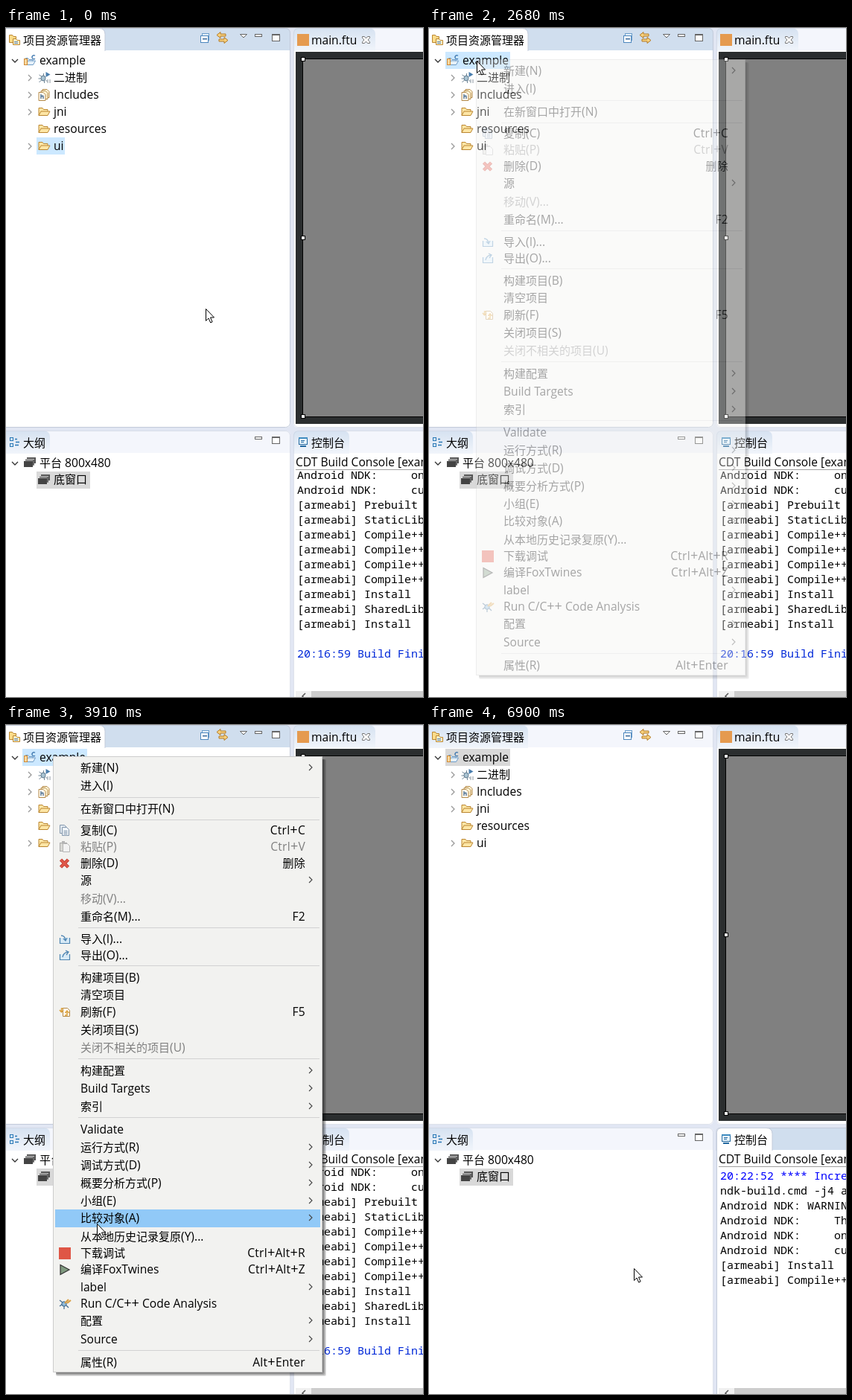
These frames come from a looping animation (560x899 px, 8950 ms). An HTML page:

```html
<!DOCTYPE html>
<html lang="zh-CN">
<head>
<meta charset="utf-8">
<title>IDE project menu</title>
<style>
html, body { margin: 0; width: 100%; height: 100%; overflow: hidden; background: #e1e6f3; }
svg { display: block; width: 560px; height: 899px; }
text { font: 15.6px "Open Sans", "Noto Sans CJK SC", "Noto Sans CJK", sans-serif; white-space: pre; }
.cjk { font-size: 15px; }
.plus { font-size: 18px; }
.mono { font: 15px "Noto Sans Mono", "DejaVu Sans Mono", monospace; }
.key { letter-spacing: .25px; }
</style>
</head>
<body>
<svg id="stage" viewBox="0 0 560 899"></svg>
<script>
const LOOP = 8950;
const GRAY = '#d9d9d9', PICK = '#cce8ff', HOVER = '#e5f3ff', MENU_HOT = '#91c9f7';

// ---- markup helpers
const rect = (x, y, w, h, fill, extra = '') =>
  `<rect x="${x}" y="${y}" width="${w}" height="${h}" fill="${fill}" ${extra}/>`;
const line = (d, stroke, w = 1, fill = 'none') =>
  `<path d="${d}" stroke="${stroke}" stroke-width="${w}" fill="${fill}"/>`;
const group = (id, body) => `<g id="${id}">${body}</g>`;
const at = (x, y, body) => `<g transform="translate(${x} ${y})">${body}</g>`;
const text = (x, y, s, fill = '#000', extra = '') =>
  `<text x="${x}" y="${y}" fill="${fill}" ${extra}>` +
  s.replace(/[\u4e00-\u9fff]+/g, '<tspan class="cjk">$&</tspan>')
    .replace(/\++/g, '<tspan class="plus">$&</tspan>') + '</text>';
const mono = (y, s, fill = '#000') => `<text class="mono" x="391" y="${y}" fill="${fill}">${s}</text>`;

// ---- icons, each about 16px
const box = (x, y, w, h, fill, stroke) => rect(x + .5, y + .5, w, h, fill, `stroke="${stroke}"`);
const folder = line('M.5 12.5V2.5h5l1.5 2h5.5v2.5M.5 12.5l3-5.5h12l-3 5.5z', '#bb8630', 1, '#fde6a6');
const page = (x, y, fill, stroke) => line(`M${x + .5} ${y + .5}h6l3 3v8h-9z`, stroke, 1, fill);
const icon = {
  folder,
  explorer: line('M.5 11.5v-10h4l1.5 2h3.5v8z', '#bb8630', 1, '#fbdc8a') +
    line('M5.5 14.5v-8h4l1.5 2h3.5v6z', '#bb8630', 1, '#fff1c4') + rect(7, 10, 5, 1, '#5b86b8') + rect(7, 12, 5, 1, '#5b86b8'),
  project: line('M2.5 13.5v-9h3l1.5 2h5v2M2.5 13.5l3-5.5h10l-3 5.5z', '#6f9cc6', 1, '#e6f1fa') +
    box(0, 5, 4, 8, '#f8d9a0', '#d08a35') + line('M15 1.2a2.500 2.500 0 1 0 0 4', '#3a74ad', 1.2),
  binary: line('M1 4l3 2M0 9h4M1 14l3-3M7 2v4M8 15v-3M12 13l-2-2', '#6d8394', 1) +
    '<ellipse cx="6.5" cy="8.5" rx="3" ry="3.500" fill="#a9c3d2" stroke="#5d788c"/>' +
    line('M10 0l6 3.5-6 3.5z', 'none', 0, '#4a7ead') + line('M12.500 10v5M15.500 10v5', '#8d98a2'),
  includes: page(5, 0, '#fff4d6', '#b48a4a') + page(3, 2, '#fff4d6', '#b48a4a') + page(0, 4, '#fffaf0', '#b48a4a') +
    line('M3.5 7v6M3.5 10q3-1.5 3 0v3', '#44698f', 1.3),
  outline: box(1, 1, 4, 4, '#cfe5f7', '#2b78b5') + box(1, 9, 4, 4, '#cfe5f7', '#2b78b5') +
    line('M8 3.5h3M8 11.5h5M9 7.5h5', '#2b78b5', 1.4),
  windows: rect(4, 0, 12, 8, '#555') + rect(2, 2, 12, 8, '#eee') + rect(2, 2.7, 12, 8, '#666') +
    rect(0, 4.5, 12, 8, '#eee') + rect(0, 5, 12, 8, '#444'),
  console: box(1, 1, 11, 9, '#e7f4fd', '#22689f') + rect(1, 1, 12, 2, '#3f8cc0') + rect(4, 5, 5, 1, '#22689f') +
    rect(4, 7, 4, 1, '#22689f') + rect(3, 12, 8, 2, '#22689f'),
  copy: page(1, 0, '#e4ebf2', '#8296ab') + page(4, 3, '#eef3f8', '#8296ab') + line('M6.5 8.5h5M6.5 10.5h5M6.5 12.5h5', '#8296ab'),
  paste: box(1, 2, 9, 11, '#d8d8d4', '#aaa') + rect(4, 0, 4, 4, '#b5b5b5') + page(5, 3, '#f2f2f2', '#b5b5b5'),
  remove: line('M2.5 3l10 10M12.5 3l-10 10', '#b8362a', 4.4) + line('M2.5 3l10 10M12.5 3l-10 10', '#e0584a', 2.8),
  import: line('M1.5 6v7.5h13V6', '#4f86b3', 1.2, '#d8eaf6') + line('M3 3q5 0 6 6M6 7l3 3 2-4', '#4f86b3', 1.3),
  export: line('M1.5 6v7.5h13V6', '#4f86b3', 1.2, '#d8eaf6') + line('M5 10q1-6 7-7M9 1l4 2-3 4', '#4f86b3', 1.3),
  refresh: page(5, 2, '#fffaf0', '#b48a4a') + line('M6 3H3.5v4M1 5l2.5 3L6 5M8 12h3V8M8.5 9l2.5-3 2.5 3', '#d99c33', 1.4),
  badge: rect(0, 0, 16, 16, '#df5646'),
  run: line('M2 1.5l12 6.5-12 6.5z', '#333', 1.2, '#7f9a7f'),
  analysis: line('M1 3l4 3M1 11l4-3M7 15v-4M13 13l-3-3', '#41698d', 1.2) +
    '<circle cx="7" cy="8" r="3.2" fill="#8fb9d8" stroke="#35628a"/>' + line('M8 7l5-5M11 7l5-4', '#d9a047', 2.2)
};

const chevron = (x, y, open) => open
  ? line(`M${x - 4} ${y - 2}l4 4 4-4`, '#333', 1.3)
  : line(`M${x - 2} ${y - 4}l4 4-4 4`, '#9a9a9a', 1.3);

// ---- panels
function panel(x, y, w, h, tabW, active) {
  const b = '#c3cbda', top = y + .5;
  const tab = `M${x} ${y + 31}V${top + 5}q0-5 5-5H${x + tabW - 8}q8 0 8 8V${y + 31}`;
  return rect(x, y, w, h, active ? '#d0deee' : '#f4f6fc', 'rx="6"') +
    rect(x, y + 30, w, h - 36, '#fff') + rect(x, y + h - 40, w, 40, '#fff', 'rx="6"') +
    line(tab, active ? b : 'none', 1, active ? '#fff' : 'url(#idle)') +
    rect(x + .5, top, w - 1, h - 1, 'none', `rx="6" stroke="${b}" stroke-opacity="${active ? 1 : .55}"`);
}
const minMax = y => box(334, y, 9, 3, '#fff', '#666') + box(357, y, 10, 9, '#fff', '#666') + rect(357, y, 11, 2, '#666');

function tree() {
  const rows = [['二进制', 'binary', 1], ['Includes', 'includes', 1], ['jni', 'folder', 1], ['resources', 'folder', 0], ['ui', 'folder', 1]];
  return rect(22, 32, 87, 23, 'none', 'id="pickRoot"') + rect(41, 147, 38, 23, 'none', 'id="pickUi"') +
    chevron(12, 44, true) + at(24, 36, icon.project) + text(45, 49, 'example') +
    rows.map(([s, ic, more], i) => {
      const y = 67 + i * 23;
      return (more ? chevron(32, y, false) : '') + at(43.5, y - 8, icon[ic]) + text(64, y + 5, s);
    }).join('');
}

const toolbar = box(263, 7, 9, 9, '#e3effa', '#6d9ecb') + box(261, 10, 10, 9, '#fff', '#4c86bd') + rect(264, 14, 6, 1.4, '#2b5f96') +
  line('M283 9.5l5-4v2.5h7v3h-7v2.5zM298 16.5l-5-4v2.5h-7v3h7v2.5z', '#b47a24', 1, '#f6cf7c') +
  line('M314.5 8.5h9l-4.5 4.5z', '#666', 1, '#fff');

function editor() {
  const grip = y => box(396, y - 3, 5, 5, '#fff', '#000') + rect(398, y - 1, 2, 2, '#fff');
  return panel(386, 0, 200, 537, 110, false) + rect(391, 8, 16, 16, '#e59a4f') + text(410, 22, 'main.ftu') +
    line('M478.5 11.5h3l2 2.5 2-2.5h3v2l-2.5 2.5 2.5 2.5v2h-3l-2-2.5-2 2.5h-3v-2l2.5-2.5-2.5-2.5z', '#777', 1, '#fff') +
    rect(389, 32, 171, 500, '#2b2e2f') + rect(398.5, 41.5, 180, 481, '#808080', 'stroke="#000"') +
    grip(42) + grip(282) + grip(522);
}

const tag = s => '[armeabi] ' + s;
const ndk = s => 'Android NDK:     ' + s;
const oldLog = [ndk('only'), ndk('current'), tag('Prebuilt'), tag('StaticLibrary'), tag('Compile++'), tag('Compile++'),
  tag('Compile++'), tag('Compile++'), tag('Install'), tag('SharedLibrary'), tag('Install'), '', '20:16:59 Build Finished'];
const newLog = ['20:22:52 **** Incremental', 'ndk-build.cmd -j4 all', 'Android NDK: WARNING:', ndk('This'), ndk('only'),
  ndk('current'), tag('Install'), tag('Compile++')];

function consoleView() {
  return group('conIdle', panel(386, 541, 200, 380, 75, false)) + group('conLive', panel(386, 541, 200, 380, 75, true)) +
    at(392, 549, icon.console) + text(410, 563, '控制台') + text(389, 589, 'CDT Build Console [example]') +
    rect(389, 593, 171, 1, '#a0a0a0') +
    `<g clip-path="url(#log)">` +
    group('oldLog', oldLog.map((s, i) => mono(606 + i * 20, s, i == 12 ? '#0028d8' : '#000')).join('')) +
    group('newLog', newLog.map((s, i) => mono(611 + i * 20, s, i ? '#000' : '#0000ff')).join('')) + '</g>' +
    rect(391, 870, 1, 20, '#000', 'id="caret"') +
    group('bar', rect(389, 891, 171, 8, '#f0f0f0') + rect(410, 891, 150, 8, '#cdcdcd') + line('M402 894l-4 4 4 4', '#555', 1.5));
}

// ---- context menu: center y, label, shortcut ('>' = submenu), icon, disabled
const items = [
  [58, '新建(N)', '>'], [82, '进入(I)'], [113, '在新窗口中打开(N)'],
  [142, '复制(C)', 'Ctrl+C', 'copy'], [164, '粘贴(P)', 'Ctrl+V', 'paste', 1], [186, '删除(D)', '删除', 'remove'],
  [209, '源', '>'], [234, '移动(V)...', '', '', 1], [258, '重命名(M)...', 'F2'],
  [288, '导入(I)...', '', 'import'], [310, '导出(O)...', '', 'export'],
  [340, '构建项目(B)'], [363, '清空项目'], [386, '刷新(F)', 'F5', 'refresh'], [410, '关闭项目(S)'],
  [434, '关闭不相关的项目(U)', '', '', 1],
  [465, '构建配置', '>'], [489, 'Build Targets', '>'], [513, '索引', '>'],
  [544, 'Validate'], [568, '运行方式(R)', '>'], [592, '调试方式(D)', '>'], [616, '概要分析方式(P)', '>'],
  [640, '小组(E)', '>'], [663, '比较对象(A)', '>'], [688, '从本地历史记录复原(Y)...'],
  [710, '下载调试', 'Ctrl+Alt+R', 'badge'], [732, '编译FoxTwines', 'Ctrl+Alt+Z', 'run'],
  [756, 'label', '>'], [778, 'Run C/C++ Code Analysis', '', 'analysis'], [801, '配置', '>'], [826, 'Source', '>'],
  [857, '属性(R)', 'Alt+Enter']
];
const half = it => it[3] ? 11 : 12;
const BUILD = items[27];

function menuRow([y, label, key, ic, off]) {
  const ink = off ? '#808080' : '#000';
  return (ic ? at(71, y - 8, icon[ic]) : '') + text(100, y + 5, label, ink) +
    (key == '>' ? line(`M407 ${y - 5}l4 4-4 4`, '#444', 1.1)
      : key ? text(402, y + 5, key, ink, 'text-anchor="end" class="key"') : '');
}
function menu() {
  const shade = [1, 2, 3, 4, 5].map(i => rect(67, 46, 358 + i, 824 + i, '#000', 'opacity=".13" rx="2"')).join('');
  return shade + rect(63.5, 42.5, 361, 827, '#f2f2f0', 'stroke="#ccc"') +
    rect(66, 0, 356, 0, MENU_HOT, 'id="hot"') +
    [97, 127, 272, 323, 448, 527, 840].map(y => rect(97, y, 324, 1, '#d2d2d2')).join('') +
    items.map(menuRow).join('');
}
const ghost = rect(66, 721, 356, 22, MENU_HOT) + menuRow(BUILD);
const tip = rect(247, 563, 268, 25, '#000', 'opacity=".2"') + rect(246, 562, 268, 25, '#000', 'opacity=".3"') +
  rect(244.5, 560.5, 267, 24, '#fff', 'stroke="#6f6f6f"') + text(250, 578, '为当前选中的项目生成模板代码及编译', '#575757');

stage.innerHTML = '<defs><linearGradient id="idle" x2="0" y2="1"><stop stop-color="#d6e2f1"/>' +
  '<stop offset="1" stop-color="#f1f5fb"/></linearGradient>' +
  '<clipPath id="log"><rect x="389" y="594" width="171" height="297"/></clipPath></defs>' +
  rect(0, 0, 560, 899, '#e1e6f3') +
  group('leftIdle', panel(-8, 0, 390, 537, 141, false)) + group('leftLive', panel(-8, 0, 390, 537, 141, true)) +
  at(4, 8, icon.explorer) + text(23, 22, '项目资源管理器') + toolbar + minMax(8) + tree() +
  panel(-8, 541, 390, 380, 67, false) + at(4, 549, icon.outline) + text(23, 563, '大纲') + minMax(549) +
  chevron(12, 585, true) + at(24, 577, icon.windows) + text(45, 590, '平台 800x480') +
  rect(41, 596, 72, 23, GRAY) + at(43, 600, icon.windows) + text(64, 612, '底窗口') +
  editor() + consoleView() + group('menu', menu()) + group('ghost', ghost) + group('tip', tip) +
  group('cursor', line('M.5 .5V16.5L4 13l2.7 6 2.4-1.1L6.5 12h5z', '#000', 1, '#fff'));

const el = id => document.getElementById(id);
const show = (id, on) => el(id).style.display = on ? '' : 'none';
const set = (id, attrs) => { for (const k in attrs) el(id).setAttribute(k, attrs[k]); };
const step = (t, first, stops) => stops.reduce((v, [when, next]) => t >= when ? next : v, first);

// Pointer legs: first step, last step, step count, end x, end y
const legs = [[340, 1190, 14, 64, 44], [3130, 3250, 3, 107, 145], [3320, 3910, 10, 122, 670], [3960, 3960, 1, 130, 693],
  [4030, 4290, 5, 137, 735], [4600, 4790, 4, 275, 730]];
function pointer(t) {
  let x = 268, y = 377;
  for (const [a, b, n, ex, ey] of legs) {
    if (t < a) break;
    const gap = (b - a) / (n - 1) || 1;
    const k = Math.min(n, Math.floor((t - a) / gap + 1e-6) + 1) / n;
    const e = k * k * (3 - 2 * k);
    x += (ex - x) * e;
    y += (ey - y) * e;
  }
  return [Math.round(x), Math.round(y)];
}

function draw(t) {
  const [x, y] = pointer(t);
  set('cursor', { transform: `translate(${x} ${y})` });

  const over = x >= 22 && x < 109 && y >= 32 && y < 55;
  set('pickRoot', { fill: step(t, over ? HOVER : 'none', [[1570, PICK], [6210, GRAY]]) });
  set('pickUi', { fill: step(t, PICK, [[1570, HOVER], [1750, 'none']]) });

  const fade = step(t, 0, [[2630, .35], [2690, .7], [2750, 1], [6210, 0]]);
  show('menu', fade);
  set('menu', { opacity: fade });
  const hot = t >= 3130 && x >= 66 && items.find(it => Math.abs(y - it[0]) <= half(it));
  set('hot', hot ? { y: hot[0] - half(hot), height: 2 * half(hot) } : { height: 0 });

  const left = step(t, 0, [[6210, .72], [6280, .45], [6340, .2], [6410, 0]]);
  show('ghost', left);
  set('ghost', { opacity: left });
  show('tip', t >= 5170 && t < 6410);

  const live = t >= 6410;
  show('leftLive', !live);
  show('leftIdle', live);
  show('conLive', live);
  show('conIdle', !live);

  const count = step(t, -1, [[6480, 0], [6550, 1], [6620, 2], [6770, 6], [6900, 8]]);
  show('oldLog', count < 0);
  [...el('newLog').children].forEach((n, i) => n.style.display = i < count ? '' : 'none');
  show('caret', t >= 6210 && t < 6480);
  show('bar', t < 6480 || t >= 6770);
}

function tick() {
  draw(performance.now() % LOOP);
  requestAnimationFrame(tick);
}
tick();
</script>
</body>
</html>
```
